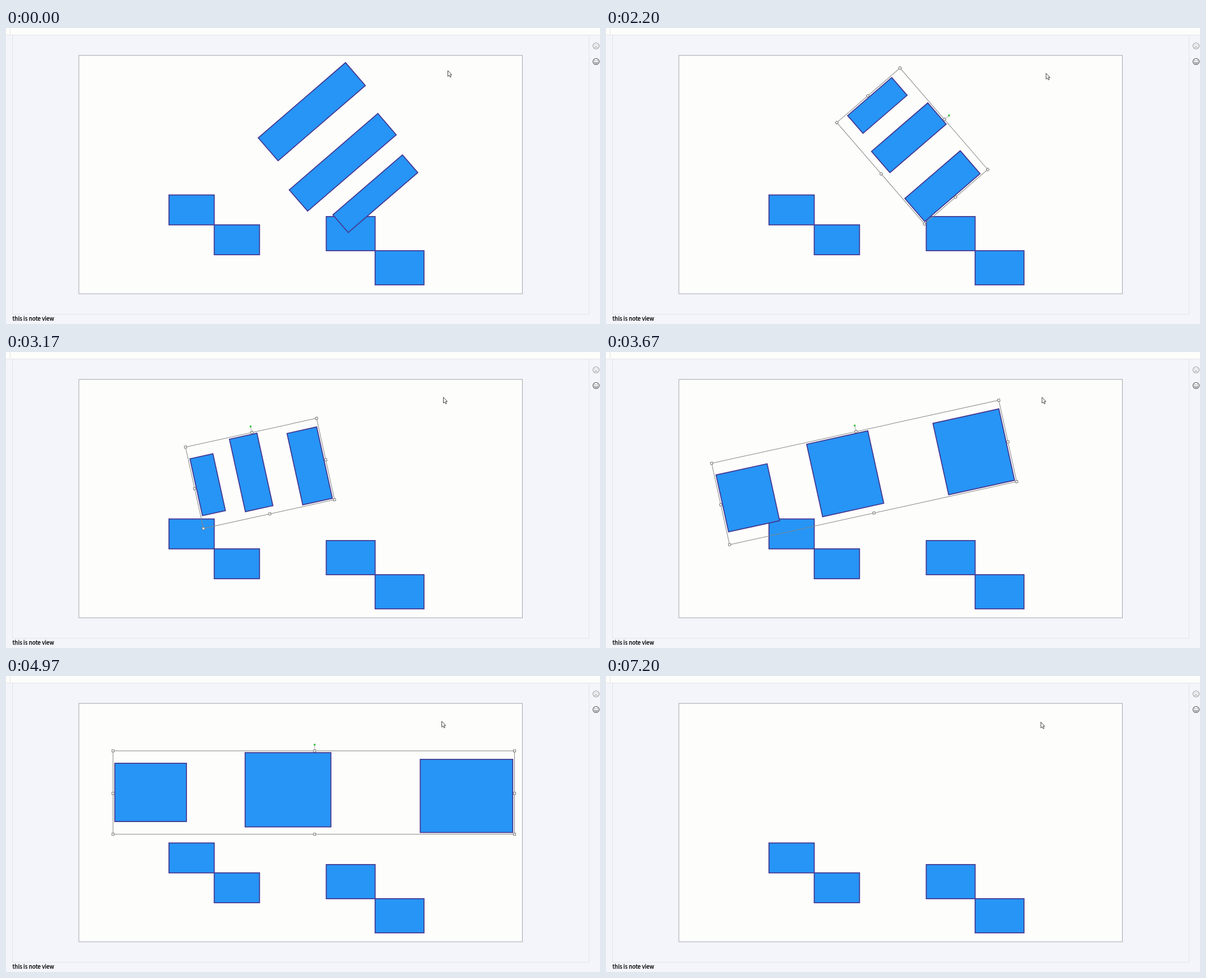
An HTML page for the animation above (8 s loop, 1060 by 529 pixels).

```html
<!DOCTYPE html>
<html lang="en">
<head>
<meta charset="utf-8">
<title>Rotating a group on a slide</title>
<style>
  html, body { margin: 0; width: 100%; height: 100%; overflow: hidden; background: #f4f5fa; }
  svg { display: block; width: 1060px; height: 529px; }
  .box { fill: #2695f6; stroke: #443a92; stroke-width: 1.8; }
  .edge { fill: none; stroke: #858585; stroke-width: 1; }
  .grip { fill: #fff; stroke: #777; stroke-width: 1; }
  .rule { fill: none; stroke: #e3e4e8; stroke-width: 1; }
  .note { font: 500 10px "Noto Sans CJK SC", "Noto Sans CJK JP", "Open Sans", sans-serif; fill: #000; stroke: #000; stroke-width: .3; }
  .face { fill: none; stroke-width: 1.1; }
</style>
</head>
<body>
<svg viewBox="0 0 1060 529">
  <rect width="1060" height="529" fill="#f4f5fa"/>
  <rect width="1060" height="12" fill="#fdfdfb"/>
  <path class="rule" d="M0 12.5H1060M11.5 13V511M1040.5 13V511M11 511.5H1041M7.5 0V12"/>
  <rect x="130" y="49" width="791.5" height="426" fill="#fdfdfc" stroke="#a3a4ac"/>
  <text class="note" x="11.6" y="523">this is note view</text>

  <g class="face" stroke="#999" transform="translate(1053 32)">
    <circle r="5.5"/>
    <path d="M-2.6 3Q0 .2 2.6 3M-2.6 -1.5h1.4M1.2 -1.5h1.4"/>
  </g>
  <g class="face" stroke="#484848" transform="translate(1053 60)">
    <circle r="5.5"/>
    <path d="M-3 1Q0 5 3 1M-2.6 -1.5h1.4M1.2 -1.5h1.4"/>
  </g>

  <g id="steps"></g>
  <g id="group"></g>
  <path id="cursor" d="M0 0V10.6L2.4 8.4L4 12L5.8 11.2L4.2 7.7H7Z" fill="#fff" stroke="#444" stroke-width="1"/>
</svg>
<script>
const LOOP = 8000, PAD = 3.2, FLIP = 2200;
const byId = id => document.getElementById(id);
const mix = (a, b, k) => a + (b - a) * k;

const rect = (cls, x, y, w, h) =>
  `<rect class="${cls}" x="${x}" y="${y}" width="${w}" height="${h}"/>`;

// Two equal boxes touching corner to corner
const stair = (x, y, w, h) => rect('box', x, y, w, h) + rect('box', x + w, y + h, w, h);
byId('steps').innerHTML = stair(290.8, 298.4, 80.8, 53.4) + stair(571.5, 337, 87.2, 61);

// Bars as fractions of the group; each is selected, then deleted, right to left
const bars = [
  { x: 0, y: .133, w: .18, h: .73, gone: 7200 },
  { x: .3275, y: 0, w: .2155, h: .93, gone: 6200 },
  { x: .7676, y: .084, w: .2324, h: .916, gone: 5970 }
];

function pose(t) {
  const ramp = (from, to) => Math.min(1, Math.max(0, (t - from) / (to - from)));
  const turn = ramp(2230, 3000), left = 135 * ramp(3270, 3370);
  const right = 342 * ramp(3570, 3800), level = ramp(3800, 4070), move = ramp(4930, 5130);
  const flipped = t >= FLIP;
  const squeeze = 82 * ramp(1530, 1730);

  const tilt = mix(49.2, -12.4, turn);
  const deg = flipped ? mix(tilt, 0, level) : 229.2;
  const rad = (flipped ? tilt : deg) * Math.PI / 180;
  const cos = Math.cos(rad), sin = Math.sin(rad);

  // A dragged edge shifts the centre by half the change in size
  const slide = (right - left) / 2, lift = squeeze / 2;
  const x = flipped
    ? mix(547, 453.8, turn) + slide * cos - 1.4 * level - 18.3 * move
    : 597.5 + lift * sin;
  const y = flipped
    ? mix(211.4, 217.4, turn) + slide * sin + 16 * level - 11.5 * move
    : 224 - lift * cos;

  const drift = ramp(0, 830), nudge = ramp(1730, 2000);
  return {
    x: x - .5, y: y - .5, deg,
    w: 239.5 + left + right,
    h: 231 - squeeze,
    px: 788.5 - 1.6 * (drift + nudge) - 4.8 * turn - 2.5 * ramp(3270, 3570) - 2 * move,
    py: 76 + 2.4 * (drift + nudge) + (t >= 7200 ? 1.4 : 0)
  };
}

// Frame with eight grips and a rotation knob; shift nudges the middle grips
function selection(x, y, w, h, shift) {
  const xs = [x, x + w / 2 + shift, x + w], ys = [y, y + h / 2 + shift, y + h];
  const mid = xs[1];
  let out = rect('edge', x, y, w, h) +
    `<path class="edge" d="M${mid} ${y}v-10" opacity=".7"/>`;
  for (let i = 0; i < 9; i++) {
    if (i !== 4) out += rect('grip', xs[i % 3] - 2, ys[Math.floor(i / 3)] - 2, 4, 4);
  }
  return out + `<circle cx="${mid}" cy="${y - 11}" r="1.7" fill="#22c32e"/>`;
}

function draw(t) {
  const { x, y, w, h, deg, px, py } = pose(t);
  const iw = w - 2 * PAD, ih = h - 2 * PAD;
  const place = b => [(b.x - .5) * iw, (b.y - .5) * ih, b.w * iw, b.h * ih];
  const left = bars.filter(b => t < b.gone);

  let out = left.map(b => rect('box', ...place(b))).join('');
  if ((t >= 1230 && t < 4470) || (t >= 4930 && t < 5130)) {
    out += selection(-w / 2, -h / 2, w, h, t < FLIP ? -1.5 : 1.5);
  } else if (t >= 5130 && left.length) {
    out += selection(...place(left[left.length - 1]), 0);
  }

  byId('group').innerHTML = out;
  byId('group').setAttribute('transform', `translate(${x} ${y}) rotate(${deg})`);
  byId('cursor').setAttribute('transform', `translate(${px} ${py})`);
}

const start = performance.now();
function tick() {
  draw((performance.now() - start) % LOOP);
  requestAnimationFrame(tick);
}
tick();
</script>
</body>
</html>
```
